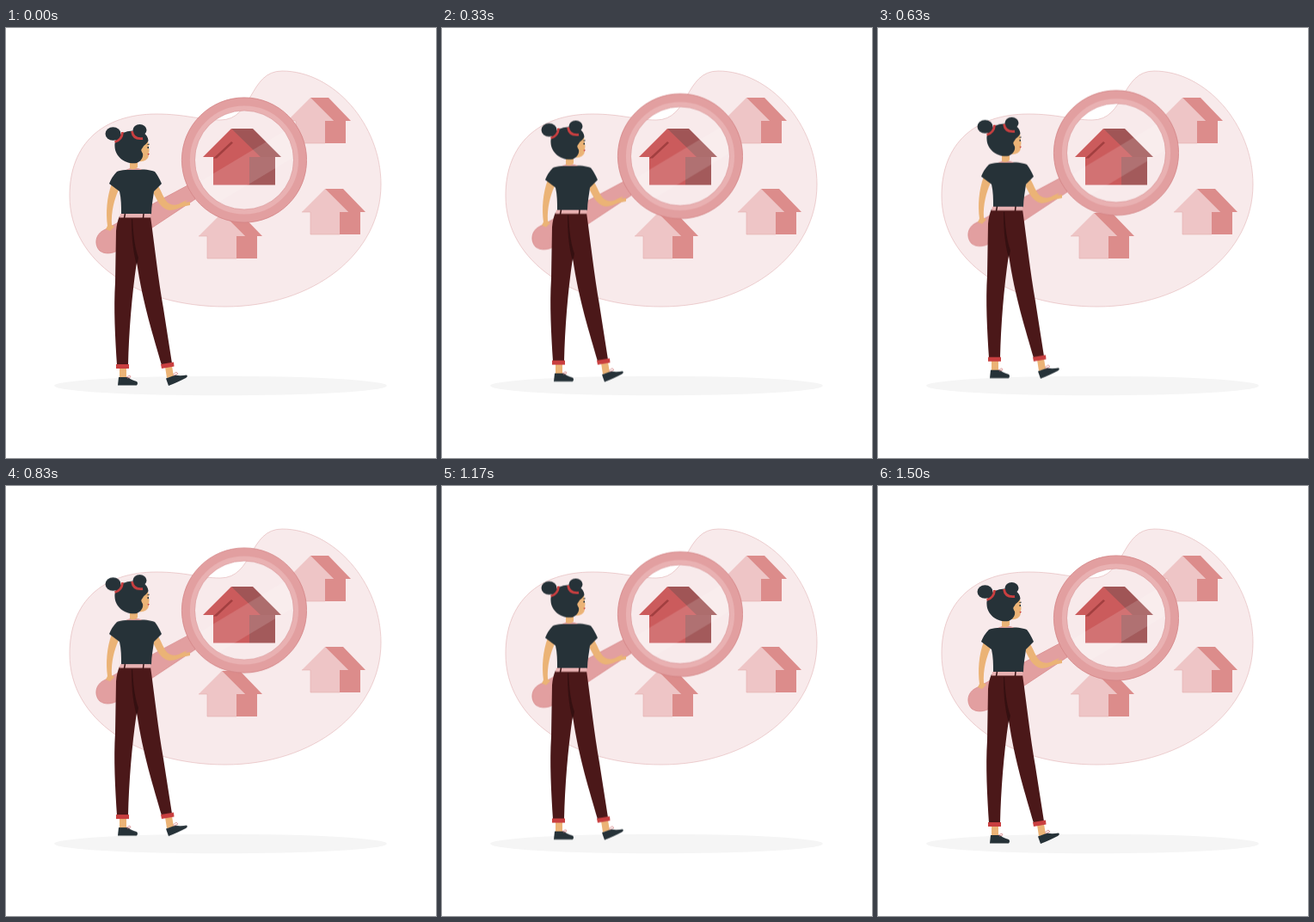
Write an HTML page without scripts that moves like this. It is 500x500 px and loops after 1.54 s.

```html
<!DOCTYPE html>
<html lang="en">
<head>
<meta charset="utf-8">
<title>House search</title>
<style>
  html, body { margin: 0; width: 100%; height: 100%; overflow: hidden; background: #fff; }
  svg { display: block; width: 100vw; height: 100vh; }
  .bob { animation: bob 1540ms -3ms infinite; }
  /* 37 equal ticks: 18 up, 18 down, one at rest */
  @keyframes bob {
    0% { transform: translateY(0); animation-timing-function: steps(18); }
    48.649% { transform: translateY(-10px); animation-timing-function: steps(18); }
    97.297%, 100% { transform: translateY(0); }
  }
  .skin { fill: #ebb376; }
  .dark { fill: #263238; }
  .red { fill: #c93f40; }
  .pants { fill: #4b1819; }
  .rose { fill: #e29fa0; stroke: #d98b8c; stroke-width: .8; }
</style>
</head>
<body>
<svg viewBox="0 0 500 500">
  <defs>
    <g id="house">
      <path fill="#eec5c6" d="M0 27 27 0 54 27H44V53H10V27Z"/>
      <path fill="#dc8c8b" d="M27 0H48L74 27H68V53H44V27H54Z"/>
      <path fill="none" stroke="#e3adae" stroke-width=".6" d="M0 27H10V53H44"/>
    </g>
    <clipPath id="glass"><circle cx="277" cy="153.5" r="57.5"/></clipPath>
  </defs>

  <path fill="#f8eaeb" stroke="#e6bcbd" stroke-width=".7" d="M74 195C74 135 112 100 175 100C208 100 226 107 249 107C288 107 282 50 321 50C381 50 436 112 436 182C436 262 358 324 255 324C153 324 74 272 74 195Z"/>
  <ellipse cx="249.5" cy="416" rx="193.5" ry="11.3" fill="#f5f5f5"/>

  <use href="#house" x="327" y="81"/>
  <use href="#house" x="344" y="187"/>
  <use href="#house" x="224" y="215"/>

  <g>
    <path fill="#a05556" d="M262 117H287L320 150H283Z"/>
    <path fill="#a35a5b" d="M283 150H313V182.500H283Z"/>
    <path fill="#cb5b5c" d="M229 150 262 117 296 150H283V182.500H241V150Z"/>
    <path fill="#a23f40" d="M241 151.500 262 132 264 133.500 245 151.500Z"/>
  </g>

  <g class="bob">
    <path clip-path="url(#glass)" fill="#fff" opacity=".14" d="M210 188 345 107V144L210 225Z"/>

    <path class="rose" d="M215 181 113 235.500C103 241 103 253 109 259C115 263.500 124 262.500 131 258L220 199Z"/>
    <circle cx="277" cy="153.500" r="65" fill="none" stroke="#e29fa0" stroke-width="15"/>
    <circle cx="277" cy="153.500" r="60.300" fill="none" stroke="#e9b1b2" stroke-width="5.600"/>
    <g fill="none" stroke="#d48586" stroke-width=".8">
      <circle cx="277" cy="153.500" r="72.600"/>
      <circle cx="277" cy="153.500" r="57.500" stroke="#dda0a1"/>
    </g>

    <!-- arms -->
    <path class="skin" d="M123 181C117 197 116 215 118 230L116 234 121 236 126 231 123 229C122 214 126 199 131 188Z"/>
    <path class="skin" d="M171 191C176 201 180 210 190 212C198 212 202 208 209 207L214 206V202L208 203 211 200 204 203C198 207 192 206 188 203C183 198 181 190 177 184Z"/>

    <!-- legs and shoes -->
    <path class="skin" d="M132 395H140V407H132ZM185 394 193 393 195 405 187 407Z"/>
    <path class="dark" d="M131 406H142C145 409 149 410 152 411Q154 413 152 415.500H130Z"/>
    <path class="dark" d="M186 407.500 197 403.500C202 405 206 404 210 403.500Q212 405 209 407C203 410 197 413 189 416Z"/>
    <path fill="none" stroke="#d98b8c" stroke-width=".8" d="M140 406 144 404 145 406 141 407M194 403 198 400 200 402 195 404"/>
    <path class="pants" d="M132 219H168C173 255 177 292 183 326L193 390 181 392C172 360 159 321 152 272C146 313 143 353 142 392H129C127 360 125 326 127 296L128 236Q129 225 132 219Z"/>
    <path fill="#351011" d="M146 222C146 240 147 257 152 276L154 267C149 253 148 237 147 222Z"/>
    <path class="red" d="M128 391H143V396H128ZM180 391 195 388.500 195.500 393.500 181 396Z"/>

    <!-- top and belt -->
    <path class="dark" d="M129 167C138 164 162 163 173 167Q177 172 181 181L172 190C171 199 169 207 169 216.500H134C134 207 134 199 132 190L120 181Q123 173 129 167Z"/>
    <path fill="#e8b1b2" d="M133 216H168.500V220.500H132Z"/>
    <path fill="none" stroke="#351011" stroke-width="1.500" d="M138.500 216 137.500 221M160 216 159.500 221"/>

    <!-- head -->
    <path fill="#d99a9b" d="M140 165C142 162 156 162 158 165Z"/>
    <path class="skin" d="M144 153H153V162Q148 166 144 163Z"/>
    <path class="skin" d="M150 131H165L166.500 142 165.500 150Q163 156 154 155Z"/>
    <path class="dark" d="M165.500 131C164 135 160 136 159 139Q156 142 159 146C160 150 157 155 152 157C139 159 127 150 126.500 138C126 126 136 120 147 119.500C156 119 165 122 165.500 131Z"/>
    <circle class="skin" cx="160" cy="142" r="2.500"/>
    <path class="dark" d="M163.500 135.500 166.500 134.500V136ZM164.500 138H166V140H164.500Z"/>
    <path class="red" d="M164.500 146H167L165.500 148Z"/>
    <ellipse class="dark" cx="124.500" cy="123" rx="9" ry="7.800"/>
    <ellipse class="dark" cx="155.500" cy="118.800" rx="8" ry="6.800"/>
    <g fill="none" stroke="#c93f40" stroke-width="2.800">
      <path d="M126.500 132.500Q135 130 135.500 121"/>
      <path d="M146.500 120Q148 130 159 128.500"/>
    </g>
  </g>
</svg>
</body>
</html>
```
